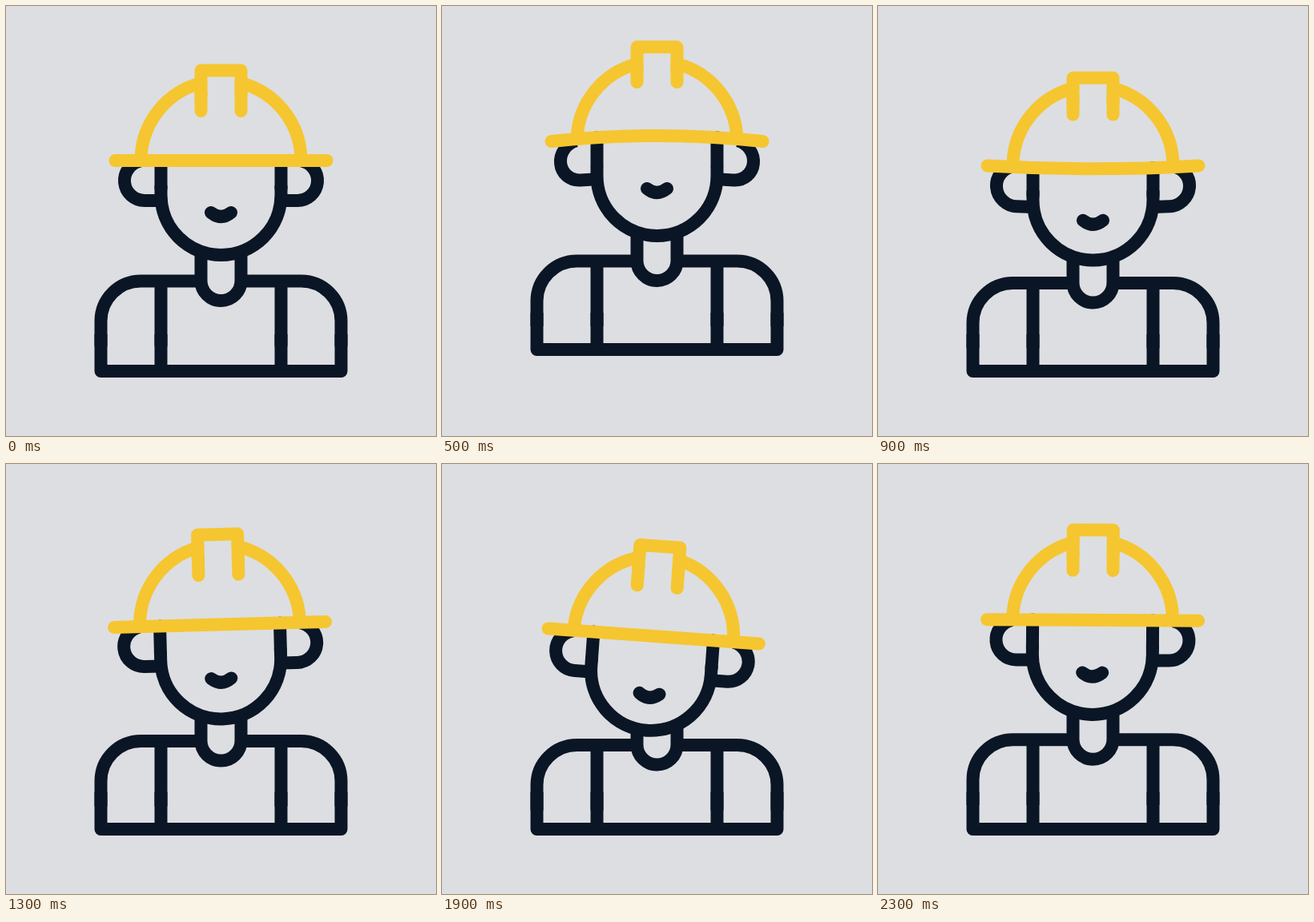
Animation of 537 by 537 pixels, one loop 2.4 s. Source, as an HTML page without scripts:

```html
<!DOCTYPE html>
<html lang="en">
<head>
<meta charset="utf-8">
<title>Builder</title>
<style>
  html, body { margin: 0; height: 100%; overflow: hidden; background: #dddee1; }

  svg {
    display: block;
    width: 100%;
    height: 100%;
    fill: none;
    stroke: #0a1625;
    stroke-width: 16;
    stroke-linejoin: round;
    animation: jump 2.4s step-end infinite, nod 2.4s step-end infinite;
  }

  .base { transform: translateY(var(--body)); }
  .torso { transform: translateY(calc(var(--neck) + 7.5px * var(--nod))); }
  .head {
    transform-origin: 268.5px 193px;
    transform: translate(calc(-4.3px * var(--nod)), calc(var(--head) + 22px * var(--nod))) rotate(var(--tilt));
  }
  .face { fill: #dddee1; }
  .temple { transform: translateY(calc(-4.7px * var(--bend))); stroke-linecap: round; }
  .ear { transform-origin: 148px 218px; transform: skewY(calc(-3.5deg * var(--bend))); }
  .mouth { transform: translateY(calc(7px * var(--nod) - 6px * var(--bend))); stroke-linecap: round; }

  .hat { stroke: #f5c630; stroke-linecap: round; }
  .brim {
    transform-origin: 0 0;
    transform: translateY(193px) scaleY(var(--bend));
    vector-effect: non-scaling-stroke;
  }
  .ridge { transform: translateY(calc(-5.2px * var(--bend))); }
  .leg { transform: translateY(var(--leg)); }

  /* bend stays just off zero so the brim keeps a valid scale */
  @keyframes jump {
    0%, 41.66%, 100% { --body: 0px; --neck: 0px; --head: 0px; --bend: .01; --leg: 0px; }
    8.33%  { --body: -6px;  --neck: -6px;  --head: -6px;  --bend: .4;   --leg: -4px; }
    12.5%  { --body: -20px; --neck: -20px; --head: -20px; --bend: 1;    --leg: -9px; }
    16.66% { --body: -30px; --neck: -29px; --head: -31px; --bend: 1.1;  --leg: -12px; }
    20.83% { --body: -27px; --neck: -25px; --head: -24px; --bend: 1;    --leg: -12px; }
    25%    { --body: -17px; --neck: -15px; --head: -13px; --bend: .5;   --leg: -8px; }
    29.16% { --body: -4px;  --neck: -2px;  --head: 1px;   --bend: .01;  --leg: -3px; }
    33.33% { --body: 0px;   --neck: 3.5px; --head: 8px;   --bend: -.5;  --leg: -2px; }
    37.5%  { --body: 0px;   --neck: 2.5px; --head: 6.5px; --bend: -.55; --leg: -2px; }
  }

  @keyframes nod {
    0%, 100% { --nod: 0; --tilt: 0deg; }
    54.16% { --nod: .34; --tilt: -1.5deg; }
    58.33% { --nod: .84; --tilt: -3.7deg; }
    62.5%  { --nod: 1;   --tilt: -4.4deg; }
    70.83% { --nod: 1;   --tilt: -3.3deg; }
    75%    { --nod: 1;   --tilt: .6deg; }
    79.16% { --nod: 1;   --tilt: 4.13deg; }
    83.33% { --nod: 1;   --tilt: 4.4deg; }
    87.5%  { --nod: .87; --tilt: 3.8deg; }
    91.66% { --nod: .5;  --tilt: 2.2deg; }
    95.83% { --nod: .09; --tilt: .35deg; }
  }
</style>
</head>
<body>
<svg viewBox="0 0 537 537">
  <defs>
    <g id="side">
      <path class="ear" d="M168 193.5A25 25 0 0 0 173 243H193"/>
      <path class="temple" d="M193.5 193V228"/>
    </g>
    <g id="shell">
      <path d="M168.6 189A100 100 0 0 1 243.5 96.2"/>
      <path class="leg" d="M243.5 108V131"/>
    </g>
  </defs>

  <path class="base" d="M118.5 410V456H418.5V410M193.5 410V456M343.5 410V456"/>
  <g class="torso">
    <path d="M118.5 425V393.5A50 50 0 0 1 168.5 343.5H243.5M293.5 343.5H368.5A50 50 0 0 1 418.5 393.5V425M193.5 343.5V425M343.5 343.5V425"/>
    <path d="M243.5 304V343A25 25 0 0 0 293.5 343V304"/>
  </g>

  <g class="head">
    <path class="face" d="M193.5 224V236A75 75 0 0 0 343.5 236V224"/>
    <use href="#side"/>
    <use href="#side" transform="matrix(-1 0 0 1 537 0)"/>
    <path class="mouth" d="M256 258Q268.5 268 281 258"/>
    <g class="hat">
      <use href="#shell"/>
      <use href="#shell" transform="matrix(-1 0 0 1 537 0)"/>
      <path class="ridge" d="M243.5 112V80.5H293.5V112"/>
      <path class="brim" d="M136.5 0Q268.5 -14 400.5 0"/>
    </g>
  </g>
</svg>
</body>
</html>
```
